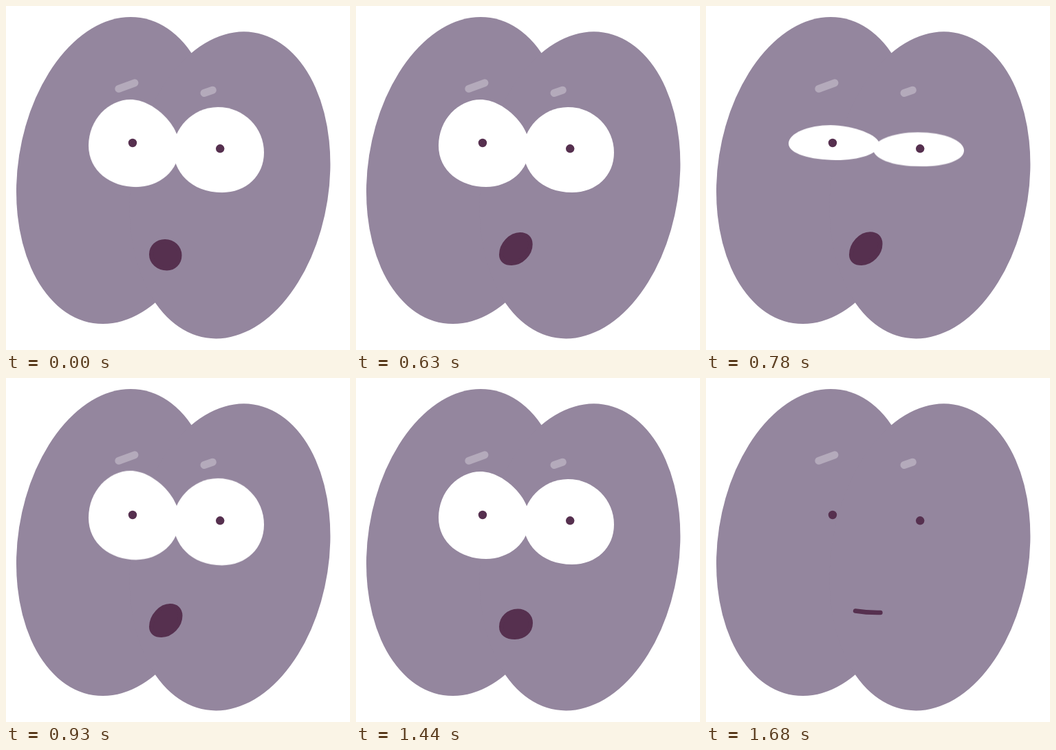
An HTML page for the animation above (2.55 s loop, 500 by 500 pixels).

```html
<!DOCTYPE html>
<html lang="en">
<head>
<meta charset="utf-8">
<title>Surprised face</title>
<style>
  html, body { margin: 0; width: 100%; height: 100%; overflow: hidden; background: #fff; }
  svg { display: block; width: 100%; height: 100%; }

  .body { fill: #94869e; }
  .brows { stroke: #b4aabb; stroke-width: 11; stroke-linecap: round; }
  .pupils { fill: #56304f; }

  .eye { fill: #fff; animation: blink 2550ms linear infinite; }
  .left { transform-origin: 186px 198px; }
  .right { transform-origin: 309px 208px; }

  .mouth {
    fill: #56304f; stroke: #56304f; stroke-width: 6.4; stroke-linejoin: round;
    animation: gasp 2550ms linear infinite;
  }

  @keyframes blink {
    0% { transform: scaleY(1); animation-timing-function: ease-out; }
    2.353% { transform: scaleY(1.045); animation-timing-function: ease-in-out; }
    8.235%, 25.098% { transform: scaleY(1); animation-timing-function: ease-in; }
    29.216% { transform: scaleY(0); }
    30.588% { transform: scaleY(.39); }
    32.549% { transform: scaleY(.92); animation-timing-function: ease-out; }
    34.118% { transform: scaleY(1.045); animation-timing-function: ease-in-out; }
    36.471% { transform: scaleY(1.02); animation-timing-function: ease-out; }
    39.216%, 56.471% { transform: scaleY(1); animation-timing-function: ease-in-out; }
    60% { transform: scaleY(1.035); animation-timing-function: ease-in; }
    64.706%, 100% { transform: scaleY(0); }
  }

  /* The closed mouth is the same outline folded flat, so its stroke draws the line. */
  @keyframes gasp {
    0% {
      d: path("M211.2 361C211.2 350 220 342.2 231 342.2C243 342.2 252.3 351.5 252.3 362.5C252.3 373.5 244 381.3 234 381.3C221 381.3 211.2 372.5 211.2 361Z");
      animation-timing-function: cubic-bezier(.25, .6, .6, .95);
    }
    16.471% {
      d: path("M211.2 361.5C211.2 347 224.5 333.7 238.5 333.7C247.5 333.7 253.8 339 253.8 347.5C253.8 361 241 373.8 226.5 373.8C217.5 373.8 211.2 369.5 211.2 361.5Z");
      animation-timing-function: ease-out;
    }
    35.294%, 44.706% {
      d: path("M211.2 361.5C211.2 346 225 331.2 238.5 331.2C247.5 331.2 253.3 336.5 253.3 345.5C253.3 360 240 373.8 226 373.8C217 373.8 211.2 369.5 211.2 361.5Z");
      animation-timing-function: ease-in;
    }
    56.471% {
      d: path("M211.2 361.5C211.2 349 222 338.7 235 338.7C246 338.7 253.8 346 253.8 356C253.8 368 244 376.8 231 376.8C219 376.8 211.2 371.5 211.2 361.5Z");
    }
    62.353% {
      d: path("M211.2 361C211.2 350 220 342.2 231 342.2C243 342.2 252.3 351.5 252.3 362.5C252.3 373.5 244 381.3 234 381.3C221 381.3 211.2 372.5 211.2 361Z");
    }
    64.706%, 100% {
      d: path("M217 338.5C217 338.5 217 338.5 217 338.5C229 340.5 241 341.2 253.5 341C253.5 341 253.5 341 253.5 341C241 341.2 229 340.5 217 338.5Z");
    }
  }
</style>
</head>
<body>
<svg viewBox="0 0 500 500">
  <g class="body">
    <ellipse rx="143.6" ry="224.6" transform="translate(161 239) rotate(8.8)"/>
    <ellipse rx="143.6" ry="224.6" transform="translate(325.4 260.4) rotate(8.8)"/>
  </g>
  <g class="brows">
    <path d="M163.8 120.3L187 111.8"/>
    <path d="M288 126.5L300.3 122.3"/>
  </g>
  <path class="eye left" d="M120 203C120 165 149 136 181 136C213 136 252 172 252 205C252 240 222 263 189 263C152 263 120 240 120 203Z"/>
  <path class="eye right" d="M243 208C243 180 270 147 308 147C346 147 375 177 375 213C375 247 349 271 314 271C268 271 243 240 243 208Z"/>
  <g class="pupils">
    <circle cx="184" cy="199" r="6.2"/>
    <circle cx="311.2" cy="207.3" r="6.2"/>
  </g>
  <path class="mouth" d="M217 338.5C217 338.5 217 338.5 217 338.5C229 340.5 241 341.2 253.5 341C253.5 341 253.5 341 253.5 341C241 341.2 229 340.5 217 338.5Z"/>
</svg>
</body>
</html>
```
